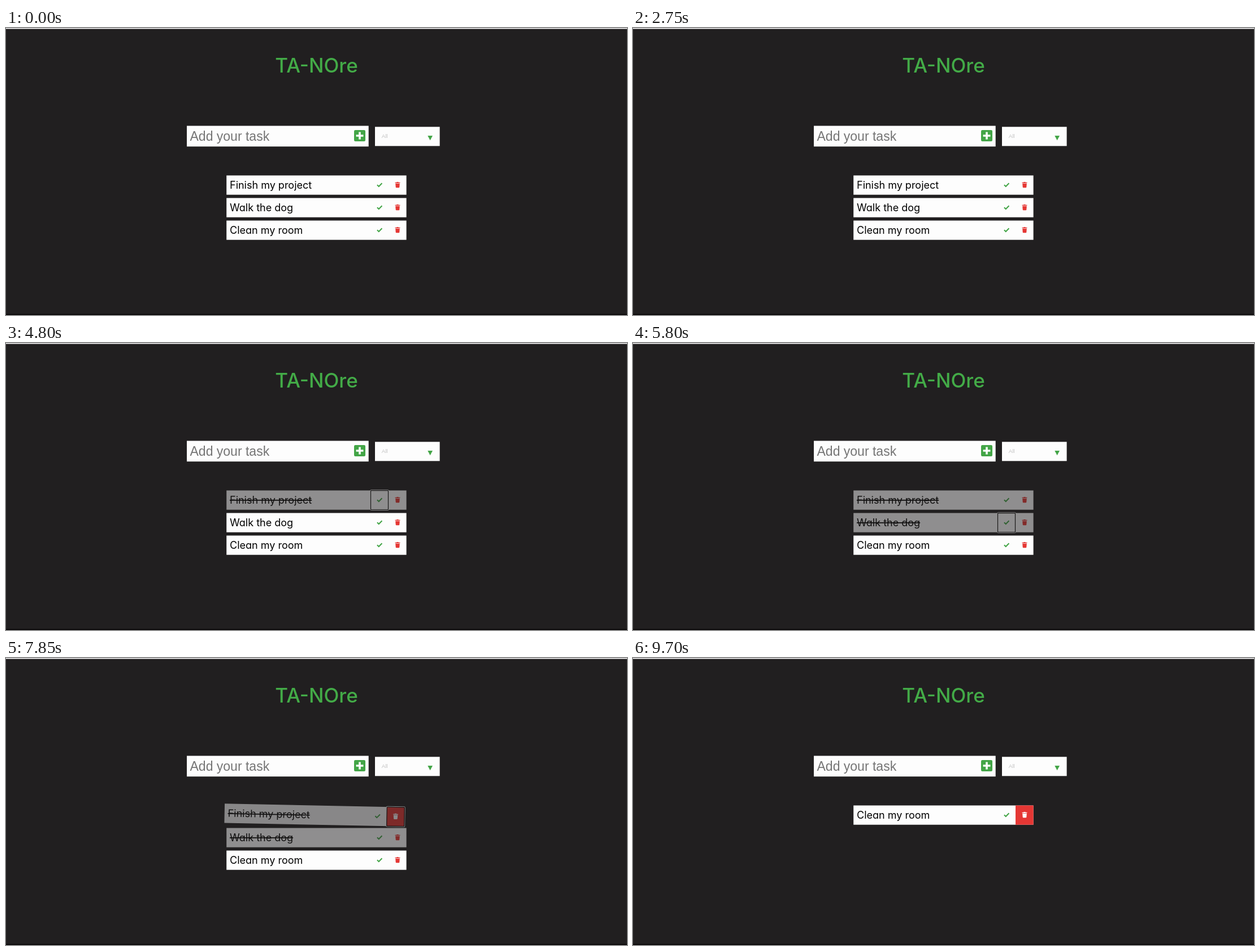
These frames come from a looping animation (1099 by 509 pixels, 9750 ms). An HTML page:

```html
<!DOCTYPE html>
<html lang="en">
<head>
<meta charset="utf-8">
<title>Task list</title>
<style>
  html, body { margin: 0; width: 100%; height: 100%; overflow: hidden; background: #211f20; }
  svg { display: block; width: 100%; height: 100%; }
  .title { font: 500 35px Inter, "Open Sans", sans-serif; fill: #43ab47; text-anchor: middle; }
  .field { font-family: "Liberation Sans", Arial, sans-serif; }
  .task { font: 400 18px Inter, "Open Sans", sans-serif; font-feature-settings: "cv11"; fill: #000; }
  .struck { text-decoration: line-through; }
</style>
</head>
<body>
<svg id="stage" viewBox="0 0 1099 509">
  <rect width="1099" height="509" fill="#211f20"/>
  <rect width="1099" height="1.6" fill="#f1f1f1"/>
  <rect y="507" width="1099" height="2" fill="#0c0a0b"/>
  <text class="title" x="549.5" y="78.5">TA-NOre</text>

  <rect x="320" y="173.5" width="321.7" height="36.7" fill="#fdfdfd"/>
  <text class="field" x="325.5" y="200" font-size="23" fill="#757575">Add your task</text>
  <rect x="616" y="181" width="20" height="20" rx="2.2" fill="#43a547"/>
  <path d="M626 184.6V197.4M619.6 191H632.4" stroke="#fff" stroke-width="3.6"/>

  <rect x="653" y="175.3" width="114.6" height="34" fill="#fdfdfd"/>
  <text class="field" x="664.7" y="195.2" font-size="9.8" fill="#c4c4c4">All</text>
  <path d="M746.3 191H755L750.6 199.2Z" fill="#43a547"/>
  <g id="list"></g>
</svg>
<script>
const LOOP = 9750, FADE = 500, PITCH = 40;
const RED = "#e53734", GREEN = "#43a547";
const NS = "http://www.w3.org/2000/svg";
const never = Infinity;

// Moments in ms; hover spans are [start, end] over the delete button.
const tasks = [
  { text: "Finish my project", done: 3000, checkFocus: [2950, 5000], fall: 7815,
    hover: [[7300, LOOP]], binFocus: [7750, LOOP] },
  { text: "Walk the dog", done: 5050, checkFocus: [5000, 7750], fall: 9150,
    hover: [[1300, 1750], [8315, LOOP]], binFocus: [9060, LOOP] },
  { text: "Clean my room", done: never, checkFocus: [never, never], fall: never,
    hover: [[9650, LOOP]], binFocus: [never, never] }
];

function add(parent, tag, attrs) {
  const node = document.createElementNS(NS, tag);
  for (const key in attrs) node.setAttribute(key, attrs[key]);
  return parent.appendChild(node);
}

function addRing(parent, x) {
  const ring = add(parent, "g", { fill: "none" });
  add(ring, "rect", { x: x - .5, y: 260.7, width: 33, height: 35.8, rx: 1.8, stroke: "#fff" });
  add(ring, "rect", { x: x + .5, y: 261.7, width: 31, height: 33.8, rx: 1, stroke: "#101010", "stroke-width": 1.2 });
  return ring;
}

function build(task) {
  const row = add(list, "g", {});
  add(row, "rect", { x: 390.2, y: 261.5, width: 318.4, height: 34.2, fill: "#fdfdfd" });
  const label = add(row, "text", { class: "task", x: 396, y: 284.5 });
  label.textContent = task.text;
  add(row, "path", { d: "M656.9 278.2L659.8 281L665.4 275.3", fill: "none", stroke: GREEN, "stroke-width": 2 });
  const fill = add(row, "rect", { x: 677, y: 261.5, width: 31.6, height: 34.2, fill: RED });
  const bin = add(row, "path", {
    d: "M688.6 273.8H691L691.6 273H694.4L695 273.8H697.4V275.1H688.6Z" +
       "M689.2 275.7H696.8L696.3 282.2Q696.2 283.2 695.2 283.2H690.8Q689.8 283.2 689.7 282.2Z"
  });
  Object.assign(task, { row, label, fill, bin,
    checkRing: addRing(row, 645), binRing: addRing(row, 677) });
}

// CSS "ease": cubic-bezier(.25, .1, .25, 1)
function ease(p) {
  if (p <= 0) return 0;
  if (p >= 1) return 1;
  const curve = (u, a, b) => 3 * u * (1 - u) * ((1 - u) * a + u * b) + u ** 3;
  let lo = 0, hi = 1;
  for (let i = 0; i < 24; i++) {
    const mid = (lo + hi) / 2;
    if (curve(mid, .25, .25) < p) lo = mid; else hi = mid;
  }
  return curve(lo, .1, 1);
}

const within = (t, [from, to]) => t >= from && t < to;
const show = (node, on) => node.setAttribute("visibility", on ? "inherit" : "hidden");

function draw(t) {
  let slot = 0;
  for (const task of tasks) {
    const gone = t >= task.fall + FADE;
    show(task.row, !gone);
    if (gone) continue;
    const drop = ease((t - task.fall) / FADE);
    const dim = ease((t - task.done) / FADE);
    const over = task.hover.some(span => within(t, span));
    task.row.setAttribute("transform",
      `translate(${-62 * drop} ${PITCH * slot++}) rotate(${20 * drop} 549.5 278.5)`);
    task.row.setAttribute("opacity", (1 - .5 * dim) * (1 - drop));
    task.label.classList.toggle("struck", t >= task.done);
    task.bin.setAttribute("fill", over ? "#fff" : RED);
    show(task.fill, over);
    show(task.checkRing, within(t, task.checkFocus));
    show(task.binRing, within(t, task.binFocus));
  }
}

const list = document.getElementById("list");
// Translucent rows stack above the plain last one.
[2, 0, 1].forEach(i => build(tasks[i]));

const start = performance.now();
function tick() {
  draw((performance.now() - start) % LOOP);
  requestAnimationFrame(tick);
}
draw(0);
requestAnimationFrame(tick);
</script>
</body>
</html>
```
